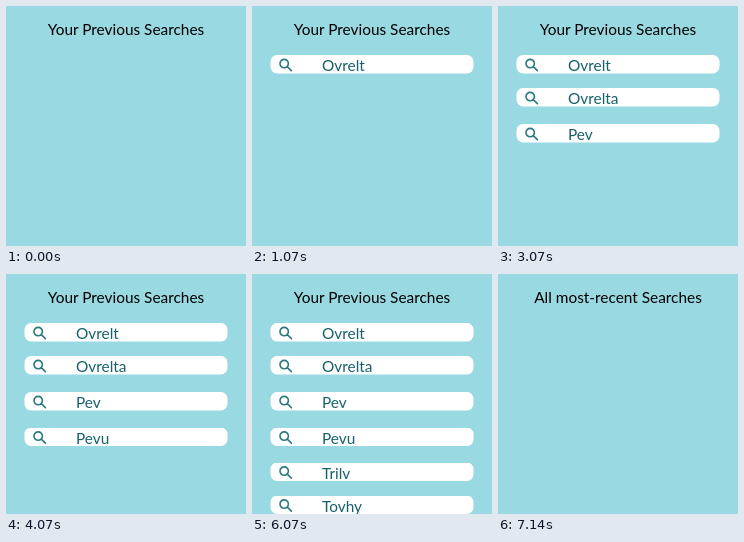
An HTML page for the animation above (8 s loop, 240 by 240 pixels).

```html
<!DOCTYPE html>
<html lang="en">
<head>
<meta charset="utf-8">
<title>Previous searches</title>
<style>
  html, body { margin: 0; width: 100%; height: 100%; overflow: hidden; background: #99d9e2; }
  svg { display: block; width: 100%; height: 100%; }
  text { font-family: Lato, "Open Sans", sans-serif; font-size: 15.4px; }
  .title { text-anchor: middle; fill: #000; }
  .row text { fill: #17616a; }
  .row rect { fill: #fff; }
  .row path { fill: none; stroke: #2b7a7c; stroke-width: 1.6; stroke-linecap: round; }
</style>
</head>
<body>
<svg viewBox="0 0 240 240"></svg>
<script>
const LOOP = 8000;
const SWITCH = 7140;
const svg = document.querySelector("svg");

const titles = [
  { text: "Your Previous Searches", from: 0, to: SWITCH },
  { text: "All most-recent Searches", from: SWITCH, to: LOOP },
];

const searches = [
  { name: "Ovrelt", y: 49, from: 1070 },
  { name: "Ovrelta", y: 82, from: 2070 },
  { name: "Pev", y: 118, from: 3070 },
  { name: "Pevu", y: 153.5, from: 4070 },
  { name: "Trilv", y: 188.5, from: 5070 },
  { name: "Tovhy", y: 221.5, from: 6070 },
];

function add(parent, tag, attrs, text = "") {
  const el = document.createElementNS("http://www.w3.org/2000/svg", tag);
  for (const [key, value] of Object.entries(attrs)) el.setAttribute(key, value);
  el.textContent = text;
  return parent.appendChild(el);
}

// Visible only between two moments of the loop, with hard cuts.
function showBetween(el, from, to) {
  const steps = [[0, 0], [from, 1], [to, to < LOOP ? 0 : 1], [LOOP, 0]];
  el.animate(
    steps.map(([time, opacity]) => ({ offset: time / LOOP, opacity, easing: "steps(1, end)" })),
    { duration: LOOP, iterations: Infinity }
  );
}

for (const { text, from, to } of titles) {
  showBetween(add(svg, "text", { class: "title", x: 120, y: 29 }, text), from, to);
}

for (const { name, y, from } of searches) {
  const row = add(svg, "g", { class: "row", transform: `translate(18 ${y})` });
  add(row, "rect", { x: 0.5, width: 203, height: 18.5, rx: 6.5 });
  add(row, "path", { d: "M18.4 8.6a4.2 4.2 0 1 1-8.4 0a4.2 4.2 0 1 1 8.4 0M17.3 11.7L21.4 15.6" });
  add(row, "text", { x: 52, y: 16 }, name);
  showBetween(row, from, SWITCH);
}
</script>
</body>
</html>
```
